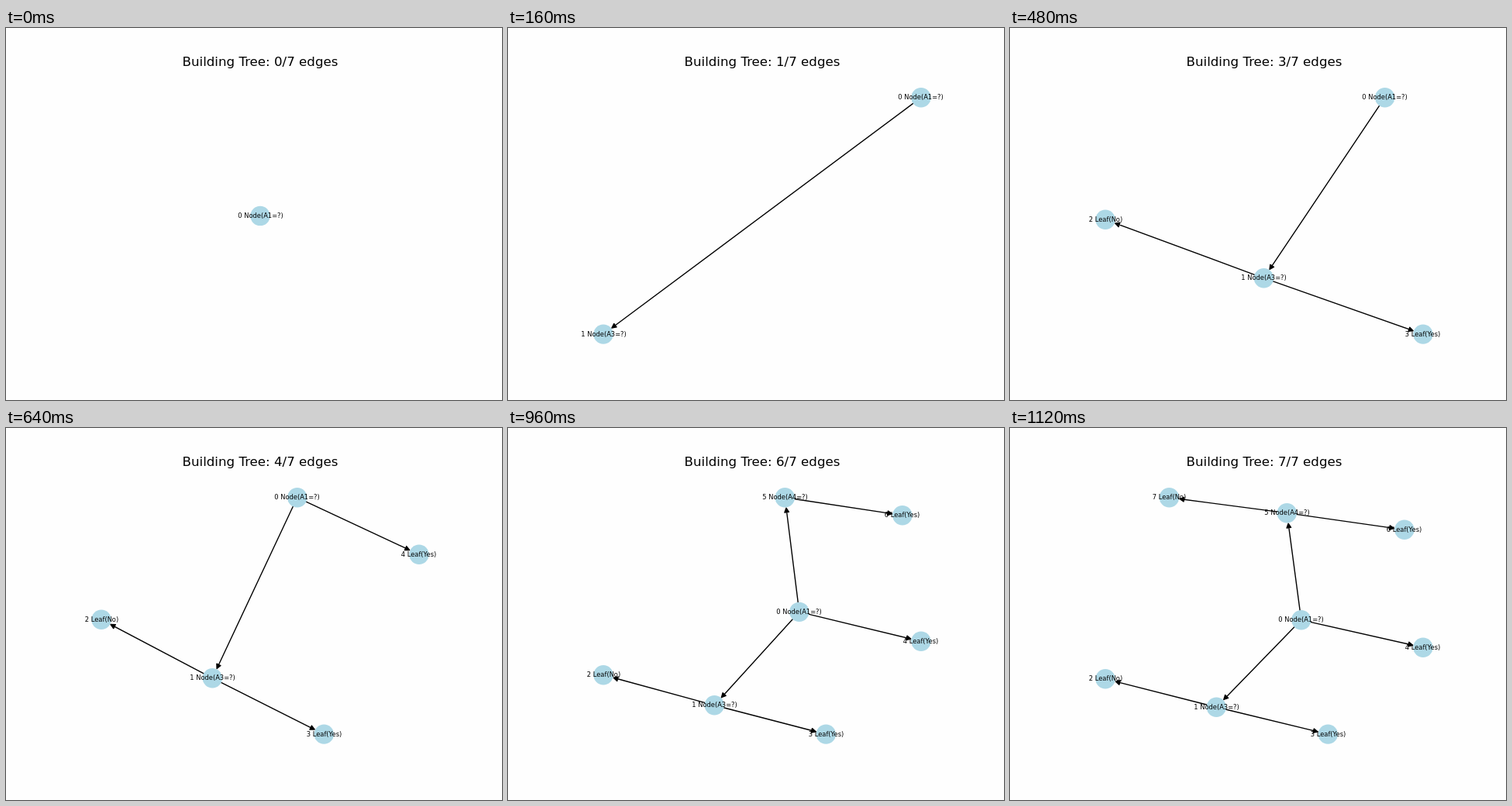
Animation, 640 px wide and 480 px high, one loop 1280 ms. Source, as an HTML page:

```html
<!DOCTYPE html>
<html lang="en">
<head>
<meta charset="utf-8">
<title>Building Tree</title>
<style>
  html, body { margin: 0; width: 100%; height: 100%; overflow: hidden; background: #fefefe; }
  svg { display: block; width: 640px; height: 480px; }
  text { font: 8.333px "DejaVu Sans", sans-serif; text-anchor: middle; fill: #000; }
  .title { font-size: 16.667px; }
  circle { fill: #add8e6; }
  .edge { fill: #000; stroke: #000; stroke-width: 1.389; stroke-linecap: round; stroke-linejoin: round; }
  .step { visibility: hidden; animation: show 1280ms step-end infinite; }
  @keyframes show {
    0% { visibility: visible; }
    12.5%, 100% { visibility: hidden; }
  }
</style>
</head>
<body>
<svg id="stage" viewBox="0 0 640 480"></svg>
<script>
const STEP_MS = 160;
const CENTER_X = 328, CENTER_Y = 242.4, WIDTH = 409.92, HEIGHT = 305.46;
const NODE_RADIUS = 12.72, EDGE_GAP = 12.03, TIP_PAD = 1.55;
const HEAD_LENGTH = 5.56, HEAD_HALF = 2.78;

// Layout positions in the unit square, y upwards
const nodes = [
  { label: "Node(A1=?)", x: 0.6166, y: 0.4826 },
  { label: "Node(A3=?)", x: 0.3495, y: 0.1144 },
  { label: "Leaf(No)",   x: 0,      y: 0.2337 },
  { label: "Leaf(Yes)",  x: 0.7008, y: 0 },
  { label: "Leaf(Yes)",  x: 1,      y: 0.3664 },
  { label: "Node(A4=?)", x: 0.5715, y: 0.9343 },
  { label: "Leaf(Yes)",  x: 0.9413, y: 0.8638 },
  { label: "Leaf(No)",   x: 0.2010, y: 1 }
];
const edges = [[0, 1], [1, 2], [1, 3], [0, 4], [0, 5], [5, 6], [5, 7]];

// Stretches values over the given size; a lone value lands on the center
function fit(values, center, size) {
  const min = Math.min(...values), max = Math.max(...values);
  return values.map(v => center + (v - (min + max) / 2) / (max - min || 1) * size);
}

function arrow([x0, y0], [x1, y1]) {
  const length = Math.hypot(x1 - x0, y1 - y0);
  const angle = Math.atan2(y1 - y0, x1 - x0) * 180 / Math.PI;
  const tip = length - EDGE_GAP - TIP_PAD;
  const back = tip - HEAD_LENGTH;
  return `<path class="edge" transform="translate(${x0} ${y0}) rotate(${angle})"
    d="M${EDGE_GAP} 0H${tip}M${back} ${HEAD_HALF}L${tip} 0L${back} ${-HEAD_HALF}Z"/>`;
}

const disc = ([x, y]) => `<circle cx="${x}" cy="${y}" r="${NODE_RADIUS}"/>`;

// Labels sit on whole pixels
const label = ([x, y], i) =>
  `<text x="${Math.floor(x) + 0.5}" y="${Math.floor(y) + 3}">${i} ${nodes[i].label}</text>`;

function drawStep(_, count) {
  const shown = nodes.slice(0, count + 1);
  const xs = fit(shown.map(n => n.x), CENTER_X, WIDTH);
  const ys = fit(shown.map(n => n.y), CENTER_Y, -HEIGHT);
  const points = xs.map((x, i) => [x, ys[i]]);
  const arrows = edges.slice(0, count).map(([a, b]) => arrow(points[a], points[b]));
  const delay = (count - nodes.length) * STEP_MS;
  return `<g class="step" style="animation-delay:${delay}ms">
    ${arrows.join("")}${points.map(disc).join("")}${points.map(label).join("")}
    <text class="title" x="${CENTER_X}" y="49">Building Tree: ${count}/${edges.length} edges</text></g>`;
}

document.getElementById("stage").innerHTML = nodes.map(drawStep).join("");
</script>
</body>
</html>
```
